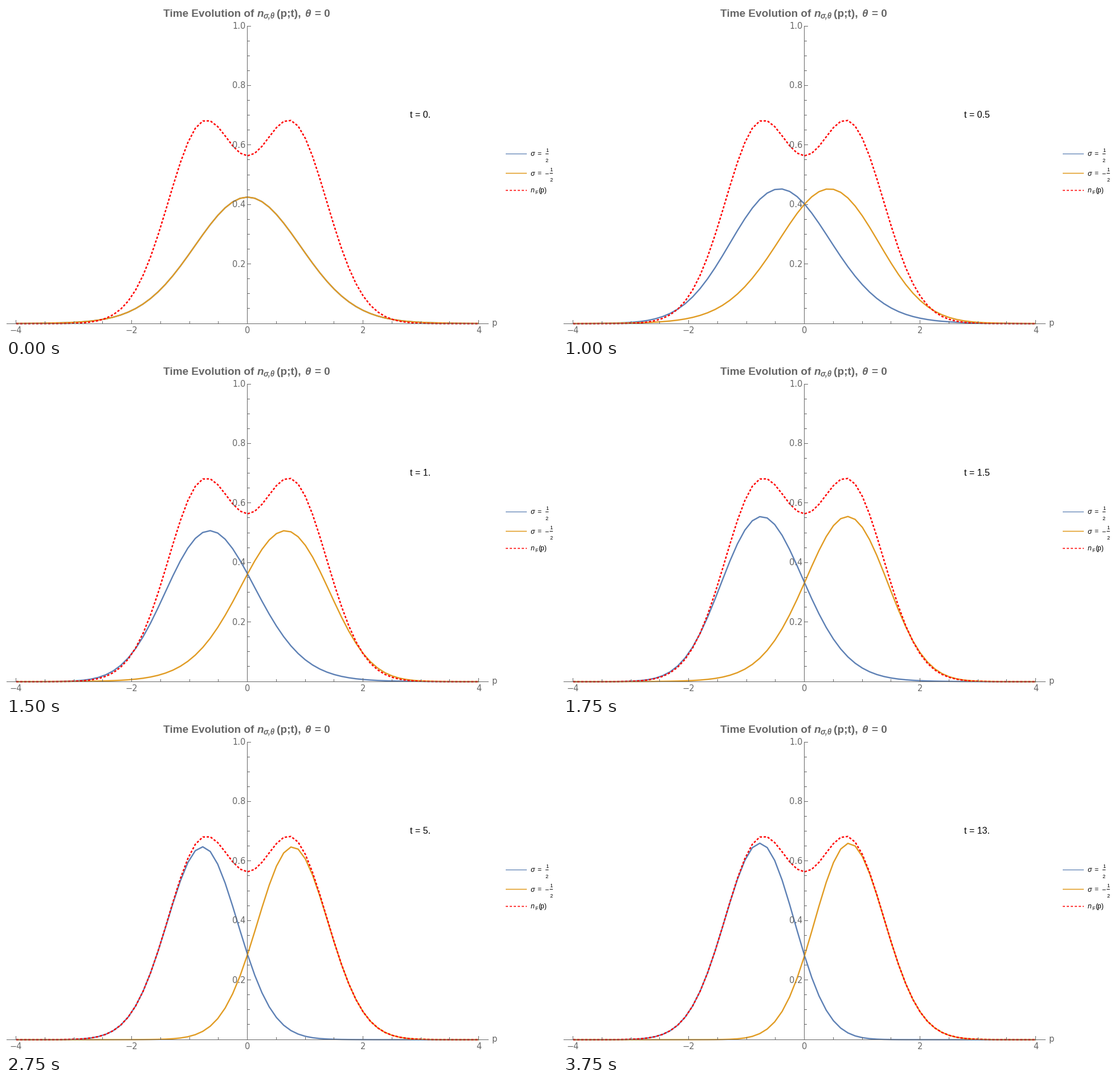
A matplotlib script for the animation above (4 s loop, 967 px wide and 579 px high).

```python
import numpy as np
import matplotlib.pyplot as plt
from matplotlib.animation import FuncAnimation

W, H, DPI = 967, 579, 64
PT = 72 / DPI                      # points per pixel
X0, Y0, SX, SY = 423.9, 557.4, 101.5, 522.0
GRAY, BLUE, ORANGE, RED = "#666666", "#5e81b5", "#e19c24", "#ff0000"
TIMES = [0, 0.05, 0.1, 0.25, 0.5, 0.75, 1, 1.5, 2, 2.5, 3, 5, 7, 9, 11, 13]

plt.rcParams["path.simplify"] = False
fig = plt.figure(figsize=(W / DPI, H / DPI), dpi=DPI, facecolor="white")
ax = fig.add_axes([0, 0, 1, 1])
ax.set_xlim(0, W)
ax.set_ylim(H, 0)
ax.axis("off")


def px(p):
    return X0 + SX * np.asarray(p)


def py(n):
    return Y0 - SY * np.asarray(n)


def line(x, y, color, width, z=2, **kw):
    return ax.plot(x, y, color=color, lw=width * PT, zorder=z, snap=False,
                   solid_capstyle="butt", solid_joinstyle="round", **kw)[0]


def dashed(x, y, width):
    return line(x, y, RED, width, z=4, dashes=(4 / width, 3 / width),
                dash_capstyle="butt")


def text(x, y, s, size, color="black", font="Liberation Sans", **kw):
    return ax.text(x, y, s, fontsize=size * PT, color=color, family=font,
                   va="baseline", zorder=6, **kw)


def rule(x, y):
    line(x, y, GRAY, 1, z=5)


def pixel(v):
    """Centre of the pixel that holds v."""
    return np.floor(v) + 0.5


# Momentum grid of the plotted polylines
p = np.concatenate([np.linspace(-4, 0, 32), np.linspace(0, 4, 33)[1:]])
fermi = np.exp(-p**2) * (1 + 2 * p**2) / np.sqrt(np.pi)

# Relative-motion grids: scaled distance r, momentum q
r = np.linspace(0, 6.5, 2201)
q = np.linspace(-10, 10, 401)
dr, dq = r[1] - r[0], q[1] - q[0]


def smear(side):
    """Centre-of-mass smoothing for the left (+1) or right (-1) particle."""
    shift = np.sqrt(2) * side * p[:, None] + q
    return np.sqrt(2 / np.pi) * np.exp(-shift**2) * dq


LEFT, RIGHT = smear(1), smear(-1)


def densities(t):
    """Momentum densities of two hard-core particles released from a trap."""
    b = np.sqrt(1 + t * t)
    chi = r * np.exp(-(1 - 1j * t) * r**2 / 2)
    amp = np.exp(-1j * b * q[:, None] * r) @ chi * dr
    rel = b * np.abs(amp)**2 * 2 / np.pi**1.5
    return LEFT @ rel, RIGHT @ rel


def draw_axes():
    rule([1, 847], [557.5, 557.5])
    rule([423.5, 423.5], [35, 557])
    for k in range(-8, 9):
        x = pixel(423.5 + SX * k / 2)
        rule([x, x], [557, 551 if k % 4 == 0 else 553])
    for k in range(1, 21):
        y = pixel(557 - SY * k / 20)
        rule([424, 430 if k % 4 == 0 else 428], [y, y])
    label = dict(color=GRAY, font="DejaVu Sans")
    for v in (-4, -2, 0, 2, 4):
        text(423.5 + SX * v, 573.5, str(v).replace("-", "\u2212"), 14.6,
             ha="center", **label)
    for v in (0.2, 0.4, 0.6, 0.8, 1.0):
        text(420.5, 562 - SY * v, f"{v:.1f}", 14.6, ha="right", **label)
    text(852.5, 561.5, "p", 14.6, **label)


def draw_title():
    bold = dict(color=GRAY, weight="bold")
    text(276.5, 19, "Time Evolution of", 19, **bold)
    text(440.5, 19, "n", 19, style="italic", **bold)
    text(452, 22, "\u03c3,\u03b8", 13.5, style="italic", **bold)
    text(474.5, 19, "(p;t),", 19, **bold)
    text(525.5, 19, "\u03b8", 19, style="italic", **bold)
    text(542, 19, "= 0", 19, **bold)


def fraction(x, y):
    text(x, y - 2.5, "1", 9, ha="center")
    line([x - 2.7, x + 2.7], [y + 0.5, y + 0.5], "black", 1, z=6)
    text(x, y + 14.5, "2", 9, ha="center")


def draw_legend():
    line([877, 914], [259.5, 259.5], BLUE, 1.3)
    line([877, 914], [293.5, 293.5], ORANGE, 1.6)
    dashed([877, 914], [323.5, 323.5], 1.6)
    for y in (263, 297.5):
        text(921, y, "\u03c3", 12, style="italic")
        text(932, y, "=", 12)
    fraction(949.5, 259)
    text(945.5, 297.5, "\u2212", 12)
    fraction(957, 293)
    text(921, 327, "n", 12, style="italic")
    text(928, 330, "F", 8.5)
    text(934.5, 327, "(p)", 12)


def clock_label(t):
    s = f"{t:g}"
    return "t = " + (s if "." in s else s + ".")


draw_axes()
draw_title()
draw_legend()
blue = line([], [], BLUE, 2.4, z=2)
orange = line([], [], ORANGE, 2.4, z=3)
dashed(px(p), py(fermi), 2.5)
clock = text(727, 196.5, "", 16, ha="center")
curves = [densities(t) for t in TIMES]


def update(i):
    left, right = curves[i]
    blue.set_data(px(p), py(left))
    orange.set_data(px(p), py(right))
    clock.set_text(clock_label(TIMES[i]))
    return blue, orange, clock


anim = FuncAnimation(fig, update, frames=len(TIMES), interval=250,
                     init_func=lambda: update(0), repeat=True,
                     repeat_delay=0, blit=False)
plt.show()
```
